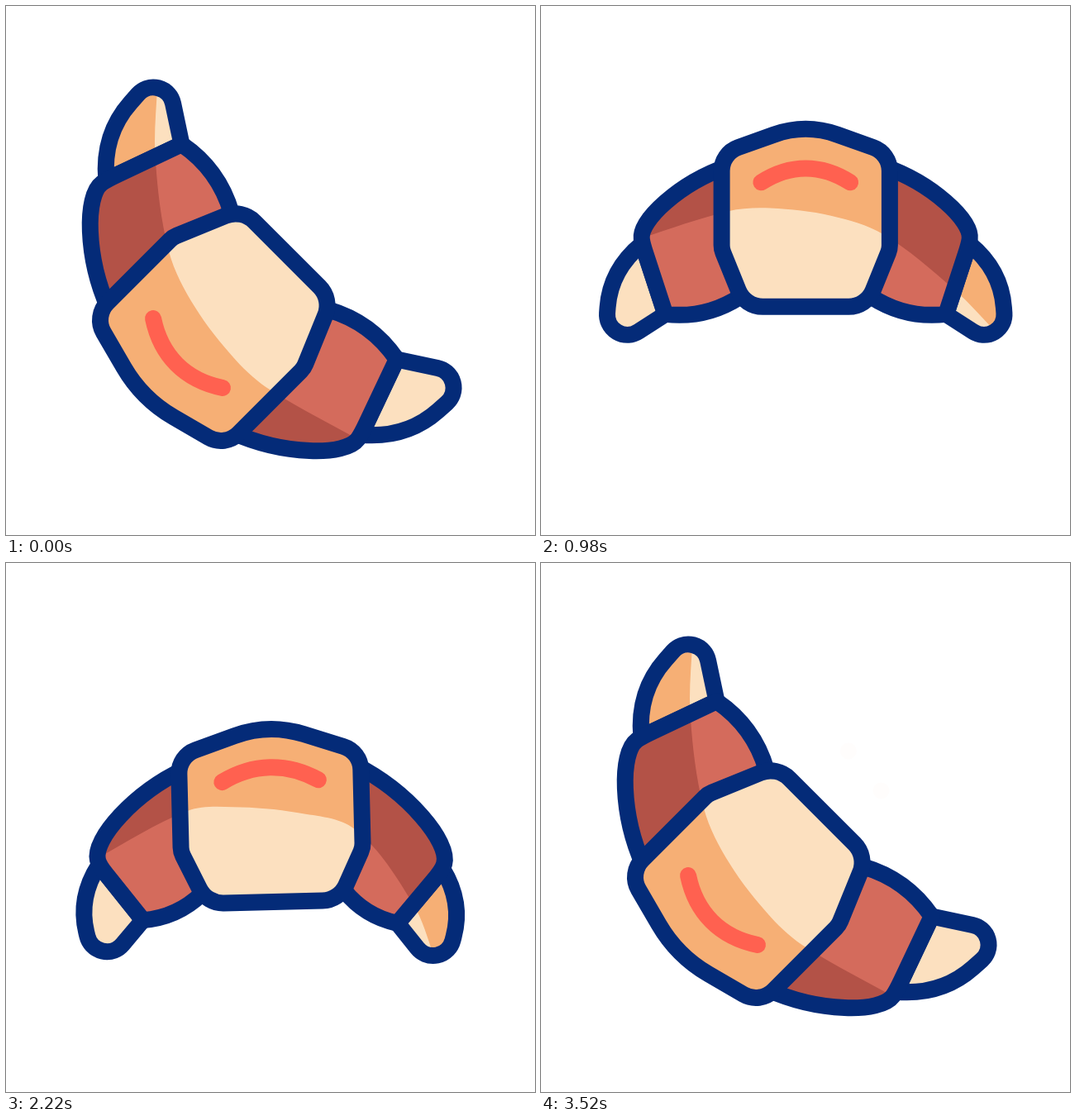
Write an HTML page with a canvas that moves like this. It is 640 px wide and 640 px high and loops after 3.6 s.

```html
<!DOCTYPE html>
<html lang="en">
<head>
<meta charset="utf-8">
<title>Croissant</title>
<style>
  html, body { margin: 0; width: 100%; height: 100%; overflow: hidden; background: #fff; }
  canvas { display: block; width: 100%; height: 100%; }
</style>
</head>
<body>
<canvas id="stage" width="640" height="640"></canvas>
<script>
const ctx = document.getElementById('stage').getContext('2d');
const LOOP = 3600, LAST = 3520;
const NAVY = '#042b78', RED = '#ff6150';
const CRUST = ['#fce0bf', '#f6af75'], CHOCO = ['#d46b5c', '#b35247'];

const clamp = x => Math.max(0, Math.min(1, x));
const lerp = (a, b, p) => a + (b - a) * p;
const ease = {
  line: p => p,
  in: p => p * p,
  out: p => 1 - (1 - p) ** 2,
  both: p => (1 - Math.cos(Math.PI * p)) / 2
};

// dx | body: half width, top, shoulder, waist, base half width, base |
// joint outer x y, joint inner x y, tip x y
const shape = {
  rest:   [0, 112, -214, -190, -55, 77, 28, 218, -63, 184, 32, 267, 86],
  turn:   [0, 102, -199, -171, -52, 73, 20, 197, -60, 171, 30, 247, 73],
  land:   [1, 100.5, -88, -54, 52, 75, 114, 200, 50, 166, 120, 234, 183],
  crouch: [1, 106, -80, -48, 55, 79, 115, 208, 50, 173, 119, 242, 178],
  leap:   [2, 97.5, -148, -114, 0, 69, 70, 181, -12, 156, 77, 222, 107],
  hang:   [1, 110, -119, -89, 27, 80, 90, 208, 48, 154, 114, 209, 181],
  coil:   [0.5, 101.5, -138, -112, 7, 76, 54, 187, 14, 129, 86, 174, 154]
};

// time, easing towards it, shape, vertical shift, lag of the arms in degrees
const poses = [
  [220, 'line', 'rest', 0, 0],
  [700, 'both', 'turn', 0, 0],
  [820, 'line', 'turn', 0, 0],
  [1150, 'in', 'land', 6, 0],
  [1260, 'out', 'land', 0, 0],
  [1420, 'both', 'crouch', 0, 0],
  [1660, 'in', 'leap', 0, 0],
  [1750, 'out', 'leap', -40, 0],
  [1840, 'in', 'leap', 1, 0],
  [2000, 'out', 'land', 6, 0],
  [2220, 'both', 'hang', 0, 2.1],
  [2380, 'line', 'hang', -1, 2.1],
  [2780, 'both', 'coil', 0, 3.9],
  [3380, 'both', 'rest', 0, 0]
].map(([t, e, name, dy, lag]) => [t, e, dy, lag, ...shape[name]]);

const turns = [
  [220, 'line', -135],
  [800, 'both', 0],
  [2000, 'line', 0],
  [2220, 'both', -1.4],
  [2780, 'line', -2],
  [3400, 'both', -135]
];

function track(keys, t) {
  const i = keys.findIndex(k => k[0] > t);
  if (i === 0) return keys[0].slice(2);
  if (i < 0) return keys[keys.length - 1].slice(2);
  const a = keys[i - 1], b = keys[i];
  const p = ease[b[1]]((t - a[0]) / (b[0] - a[0]));
  return a.slice(2).map((v, j) => lerp(v, b[j + 2], p));
}

const mix = (p, q, f) => [lerp(p[0], q[0], f), lerp(p[1], q[1], f)];

// Point beside the line pq: f along it, k to its side
function beside(p, q, f, k) {
  const x = q[0] - p[0], y = q[1] - p[1];
  return [p[0] + f * x + k * y, p[1] + f * y - k * x];
}

function bodyPath(b) {
  const path = new Path2D();
  const peak = (b.top - 0.19 * b.sho) / 0.81;
  const x = 0.38 * b.w, y = lerp(b.sho, peak, 0.62);
  path.moveTo(-x, y);
  path.quadraticCurveTo(0, peak, x, y);
  path.arcTo(b.w, b.sho, b.w, b.waist, 30);
  path.arcTo(b.w, b.waist, b.bw, b.bot, 24);
  path.arcTo(b.bw, b.bot, -b.bw, b.bot, 32);
  path.arcTo(-b.bw, b.bot, -b.w, b.waist, 32);
  path.arcTo(-b.w, b.waist, -b.w, b.sho, 24);
  path.arcTo(-b.w, b.sho, -x, y, 30);
  path.closePath();
  return path;
}

function wingPath(b, { out, inn }, s) {
  const from = [s * (b.w - 6), lerp(b.sho, b.waist, 0.14)];
  const to = [s * (b.bw + 6), b.bot - 12];
  const c1 = beside(from, out, 0.4, 0.17 * s);
  const c2 = beside(from, out, 0.88, 0.17 * s);
  const low = beside(inn, to, 0.5, 0.18 * s);
  const path = new Path2D();
  path.moveTo(...from);
  path.bezierCurveTo(...c1, ...c2, ...mix(out, c2, 0.2));
  path.quadraticCurveTo(...out, ...mix(out, inn, 0.15));
  path.lineTo(...inn);
  path.quadraticCurveTo(...low, ...to);
  path.closePath();
  return path;
}

function tipPath({ out, inn, tip }, s) {
  const c = beside(out, tip, 0.3, 0.185 * s);
  const path = new Path2D();
  path.moveTo(...inn);
  path.lineTo(...out);
  path.quadraticCurveTo(...c, ...mix(c, tip, 0.45));
  path.arcTo(...tip, ...inn, 24.5);
  path.closePath();
  return path;
}

// Area above the smooth line that parts light and dark crust
function shadePath(b, left, right) {
  const level = f => lerp(b.top, b.bot, f);
  const pts = [
    [left.out[0] - 10, left.out[1] - 4],
    [-0.92 * b.w, level(0.462)],
    [-0.42 * b.w, level(0.445)],
    [0.3 * b.w, level(0.488)],
    [0.92 * b.w, level(0.592)],
    mix(right.out, right.inn, 0.65),
    [right.tip[0] - 6, right.tip[1] - 18]
  ];
  const at = i => pts[Math.max(0, Math.min(pts.length - 1, i))];
  const path = new Path2D();
  path.moveTo(...pts[0]);
  for (let i = 0; i < pts.length - 1; i++) {
    const [a, p, q, z] = [at(i - 1), at(i), at(i + 1), at(i + 2)];
    const d = Math.hypot(q[0] - p[0], q[1] - p[1]);
    const k = (m, n) => d / 3 / Math.hypot(n[0] - m[0], n[1] - m[1]);
    const u = k(a, q), v = k(p, z);
    path.bezierCurveTo(
      p[0] + (q[0] - a[0]) * u, p[1] + (q[1] - a[1]) * u,
      q[0] - (z[0] - p[0]) * v, q[1] - (z[1] - p[1]) * v, ...q);
  }
  path.lineTo(right.tip[0] + 15, right.tip[1] + 20);
  path.lineTo(400, 100);
  path.lineTo(400, -400);
  path.lineTo(-400, -400);
  path.lineTo(-400, pts[0][1]);
  path.closePath();
  return path;
}

function part(path, [light, dark], shade) {
  ctx.fillStyle = light;
  ctx.fill(path);
  if (shade) {
    ctx.save();
    ctx.clip(path);
    ctx.fillStyle = dark;
    ctx.fill(shade);
    ctx.restore();
  }
  ctx.strokeStyle = NAVY;
  ctx.stroke(path);
}

function croissant(t) {
  const [dy, lag, dx, w, top, sho, waist, bw, bot, ox, oy, ix, iy, tx, ty] = track(poses, t);
  const b = { w, top, sho, waist, bw, bot };
  const r = lag * Math.PI / 180, cos = Math.cos(r), sin = Math.sin(r);
  const swing = (x, y) => [x * cos - y * sin, x * sin + y * cos];
  const arm = s => ({ out: swing(s * ox, oy), inn: swing(s * ix, iy), tip: swing(s * tx, ty) });
  const left = arm(-1), right = arm(1);
  const shade = shadePath(b, left, right);

  ctx.save();
  ctx.translate(320 + dx, 320 + dy);
  ctx.rotate(track(turns, t)[0] * Math.PI / 180);
  part(tipPath(left, -1), CRUST);
  part(tipPath(right, 1), CRUST, shade);
  part(wingPath(b, left, -1), CHOCO, shade);
  part(wingPath(b, right, 1), CHOCO, shade);
  part(bodyPath(b), CRUST, shade);

  const h = 0.53 * w, end = lerp(top, bot, 0.3), bend = lerp(top, bot, 0.195);
  ctx.strokeStyle = RED;
  ctx.beginPath();
  ctx.moveTo(-h, end);
  ctx.bezierCurveTo(-0.35 * h, bend, 0.35 * h, bend, h, end);
  ctx.stroke();
  ctx.restore();
}

function sparks(t, start, x, y, deg) {
  const p = (t - start) / 360;
  if (p <= 0 || p > 1) return;
  const far = ease.out(clamp(p / 0.35));
  const near = Math.min(far, 0.25 + 0.75 * ease.out(clamp((p - 0.2) / 0.6)));
  ctx.save();
  ctx.translate(x, y);
  ctx.rotate(deg * Math.PI / 180);
  ctx.globalAlpha = clamp((1.003 - p) / 0.2);
  ctx.strokeStyle = RED;
  for (const [u, v] of [[-21, -59], [41, -53]]) {
    ctx.beginPath();
    ctx.moveTo(u * near, v * near);
    ctx.lineTo(u * far + 0.01, v * far);
    ctx.stroke();
  }
  ctx.restore();
}

const begin = performance.now();

function draw(now) {
  const t = Math.min(Math.max(0, now - begin) % LOOP, LAST);
  ctx.fillStyle = '#fff';
  ctx.fillRect(0, 0, 640, 640);
  ctx.lineWidth = 20;
  ctx.lineCap = ctx.lineJoin = 'round';
  sparks(t, 1132, 322, 224, 0);
  sparks(t, 3160, 345, 284, 45);
  croissant(t);
  requestAnimationFrame(draw);
}
draw(begin);
</script>
</body>
</html>
```
